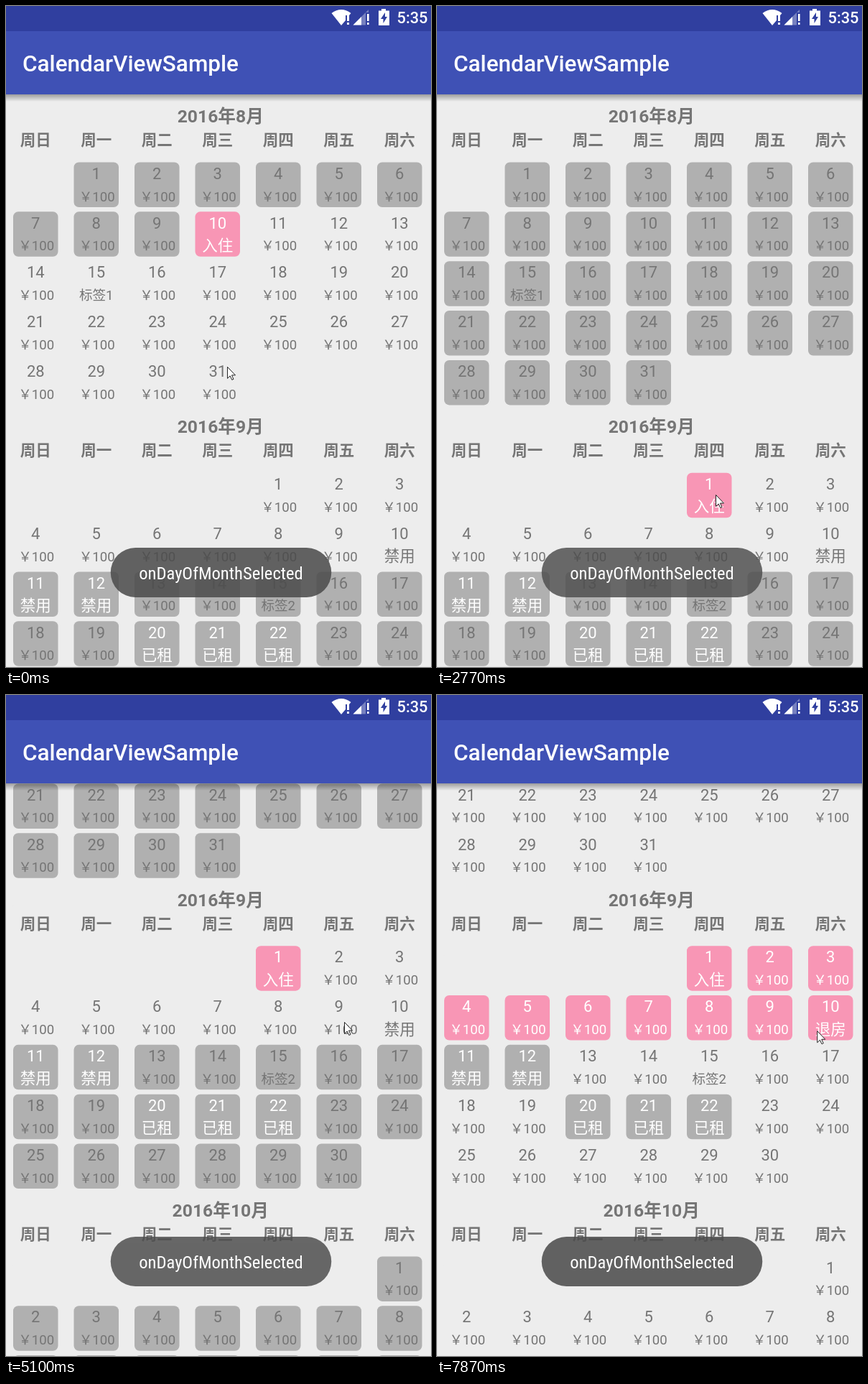
These frames come from a looping animation (592x920 px, 8 s). An HTML page:

```html
<!DOCTYPE html>
<html lang="zh-CN">
<head>
<meta charset="utf-8">
<style>
html, body { margin: 0; width: 592px; height: 920px; overflow: hidden; background: #ededed; }
svg { display: block; font-family: Roboto, "Noto Sans CJK SC", "Noto Sans CJK", sans-serif; }
#list, #toast text { text-anchor: middle; }
#list { fill: #757575; }
.title { font-size: 24.7px; font-weight: 700; }
.week { font-size: 21.5px; font-weight: 700; }
.num { font-size: 22px; }
.small { font-size: 18.6px; }
.big { font-size: 21.5px; }
.on { fill: #fff; }
#toast text { font: 24.6px "Roboto Condensed", Roboto, sans-serif; font-stretch: 75%; fill: #fff; }
</style>
</head>
<body>
<svg width="592" height="920" viewBox="0 0 592 920">
  <defs>
    <linearGradient id="shade" x2="0" y2="1">
      <stop stop-opacity=".34"/><stop offset=".5" stop-opacity=".17"/><stop offset="1" stop-opacity="0"/>
    </linearGradient>
  </defs>
  <rect width="592" height="920" fill="#ededed"/>
  <g id="list"></g>
  <rect y="123" width="592" height="10" fill="url(#shade)"/>
  <rect width="592" height="123" fill="#3f51b5"/>
  <rect width="592" height="35" fill="#303f9f"/>
  <g fill="#fff">
    <path d="M453.5 10Q467 0 480.5 10L478 13H473V20L467 27Z"/>
    <path d="M475 11h3v10h-3zM475 23h3v3h-3zM503 11h2.6v10h-2.6zM503 23h2.6v3h-2.6z"/>
    <path d="M483.5 26.5L505 5V9H501V26.5Z" opacity=".35"/>
    <path d="M483.5 26.5L495 15V26.5Z"/>
    <path d="M523 4h6v2.5h5v20.5h-15v-20.5h4z"/>
    <path d="M528 9l-6 9h3.5v6l5.5-9h-3z" fill="#303f9f"/>
    <text x="544.5" y="24.3" font-size="21.8" font-weight="500">5:35</text>
    <text x="23" y="91" font-size="31.5" font-weight="500">CalendarViewSample</text>
  </g>
  <g id="toast">
    <rect y="754" height="69" rx="34.5" fill="#4c4c4c" fill-opacity=".87"/>
    <text x="299.5" y="798"></text>
  </g>
  <path id="cursor" d="M.5.5V16.5L4.2 13L6.8 18.5L9 17.5L6.5 12H11.5Z" fill="#fff" stroke="#222"/>
</svg>
<script>
const LOOP = 8000, GLIDE = 700, FADE = 200, NOTCH = 100.2;
const COL = 84.5, ROW = 68.85, TILE = 62.5;

// Cursor glides: start time and where it comes to rest
const glides = [
  { at: -GLIDE, x: 308, y: 502 }, { at: 0, x: 302, y: 469 }, { at: 1790, x: 388, y: 680 },
  { at: 2950, x: 398, y: 686 }, { at: 3950, x: 471, y: 455 }, { at: 5700, x: 388, y: 399 },
  { at: 6700, x: 540, y: 458 }, { at: 7600, x: 526, y: 470 },
];
// Clicks choose check-in and check-out in turn; days count from August 1st
const clicks = [
  { at: 0, day: 10 }, { at: 850, day: 24 }, { at: 2700, day: 32 },
  { at: 5510, day: 40 }, { at: 6790, day: 32 }, { at: 7600, day: 41 },
];
const wheel = [{ at: 3190 }, { at: 3340 }, { at: 4050 }];
const toasts = [
  { at: -FADE, text: 'onDayOfMonthSelected' },
  { at: 2960, text: 'onDateRangeSelected' },
  { at: 4910, text: 'onDayOfMonthSelected' },
];

const $ = s => document.querySelector(s);
const past = (list, t) => list.filter(e => e.at <= t);
const clamp = v => Math.min(1, Math.max(0, v));
const easeOut = k => 1 - (1 - k) ** 3;
const colX = c => 41.25 + COL * c;
const text = (cls, x, y, s) => `<text class="${cls}" x="${x}" y="${y}">${s}</text>`;
const blocked = id => id > 40 && id < 44 ? '禁用' : id > 50 && id < 54 ? '已租' : '';

function cell(day, id, x, y, month, { from, to, limit }) {
  const chosen = id >= from && id <= (to || from);
  const open = !to && id === limit;
  const off = !chosen && !open && (blocked(id) || !to && (id < from || id > limit));
  const on = chosen || blocked(id) && !open ? ' on' : '';
  const label = id === from ? '入住' : id === to ? '退房' : chosen ? '' : blocked(id);
  const fill = chosen ? '#f896b5' : off ? '#b0b0b0' : 'none';
  const small = day === 15 ? '标签' + month : '￥100';
  return `<rect x="${x - TILE / 2}" y="${y}" width="${TILE}" height="${TILE}" rx="7" fill="${fill}"/>` +
    text('num' + on, x, y + 23.2, day) +
    (label ? text('big' + on, x, y + 54.5, label) : text('small' + on, x + (day !== 15), y + 54, small));
}

function selection(t) {
  const days = past(clicks, t).map(c => c.day);
  const to = days.length % 2 ? 0 : days.pop();
  const from = days.pop();
  let limit = from;
  while (!blocked(limit)) limit++;
  return { from, to, limit };
}

function calendar(t) {
  const sel = selection(t);
  let top = 217.5 - NOTCH * past(wheel, t).length, id = 1, out = '';
  for (let m = 8; m <= 10; m++) {
    const first = new Date(2016, m - 1, 1).getDay(), days = new Date(2016, m, 0).getDate();
    out += text('title', 298.8, top - 55.3, `2016年${m}月`);
    [...'日一二三四五六'].forEach((d, c) => out += text('week', colX(c), top - 23.5, '周' + d));
    for (let d = 1; d <= days; d++, id++) {
      const slot = first + d - 1;
      out += cell(d, id, colX(slot % 7), top + ROW * Math.floor(slot / 7), m - 7, sel);
    }
    top += 88 + ROW * Math.ceil((first + days) / 7);
  }
  return out;
}

function cursorAt(t) {
  const [b, a = b] = past(glides, t).reverse();
  const k = easeOut(clamp((t - b.at) / GLIDE));
  return [a.x + (b.x - a.x) * k, a.y + (b.y - a.y) * k];
}

function showToast(t) {
  const n = past(toasts, t).length, now = toasts[n - 1], next = toasts[n];
  const label = $('#toast text'), box = $('#toast rect');
  label.textContent = now.text;
  const w = label.getComputedTextLength() + 79;
  box.setAttribute('x', 299.5 - w / 2);
  box.setAttribute('width', w);
  const left = next ? next.at - t : LOOP;
  $('#toast').setAttribute('opacity', clamp(Math.min(t - now.at, left) / FADE));
}

let drawn = '';
function frame() {
  const t = performance.now() % LOOP;
  const html = calendar(t);
  if (html !== drawn) $('#list').innerHTML = drawn = html;
  $('#cursor').setAttribute('transform', `translate(${cursorAt(t)})`);
  showToast(t);
  requestAnimationFrame(frame);
}
frame();
</script>
</body>
</html>
```
